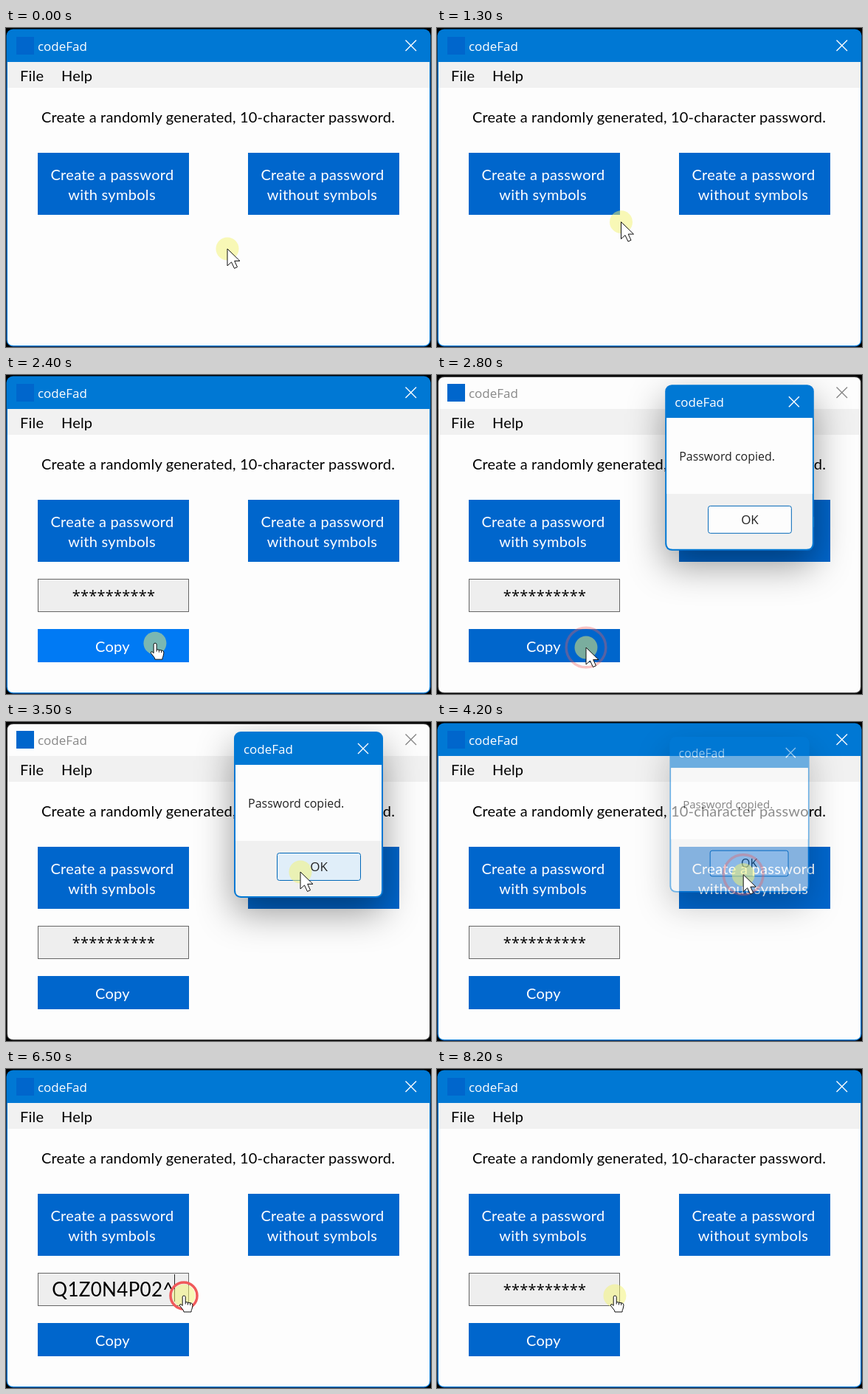
Write an HTML page that moves like this. It is 576 px wide and 432 px high and loops after 8300 ms.

```html
<!DOCTYPE html>
<html lang="en">
<head>
<meta charset="utf-8">
<title>Password generator</title>
<style>
html, body { margin: 0; width: 576px; height: 432px; overflow: hidden; background: #000; }
svg { display: block; }
text { font: 20px Lato, sans-serif; letter-spacing: .2px; }
.mid { text-anchor: middle; }
.sys { font: 17px "Open Sans", sans-serif; letter-spacing: 0; }
.msg { font-size: 16px; }
.btn rect { fill: #0066cc; }
.btn.hover rect { fill: #007af4; }
.btn text { fill: #fff; text-anchor: middle; letter-spacing: .3px; }
.x { stroke-width: 1.4; fill: none; }
#mask { font: 20px "Open Sans", sans-serif; }
#plain { font-size: 26px; letter-spacing: .3px; }
#dialog { transform-origin: 410px 125px; filter: drop-shadow(0 20px 25px rgba(0,0,0,.4)); }
</style>
</head>
<body>
<svg width="576" height="432" viewBox="0 0 576 432">
  <rect id="frame" x=".5" y="1.500" width="575" height="430" rx="9"/>
  <path id="bar" d="M2 46V11q0-8 8-8H566q8 0 8 8V46z"/>
  <path d="M2 46H574V422q0 8-8 8H10q-8 0-8-8z" fill="#fdfdfd"/>
  <rect x="2" y="46" width="572" height="35" fill="#f1f1f1"/>
  <rect x="14" y="12" width="24" height="24" fill="#0066cc"/>
  <text id="title" class="sys" x="43" y="31">codeFad</text>
  <path id="close" class="x" d="M541.500 16.500l14.500 14.500m0-14.500l-14.500 14.500"/>
  <text x="19" y="72">File</text>
  <text x="75" y="72">Help</text>
  <text class="mid" x="287.500" y="128">Create a randomly generated, 10-character password.</text>

  <g class="btn" id="with">
    <rect x="43" y="169" width="205" height="84"/>
    <text x="144" y="206">Create a password</text>
    <text x="143.500" y="233">with symbols</text>
  </g>
  <g class="btn">
    <rect x="328" y="169" width="205" height="84"/>
    <text x="429" y="206">Create a password</text>
    <text x="428.500" y="233">without symbols</text>
  </g>
  <g id="result">
    <rect x="43.500" y="276.500" width="204" height="44" fill="#eee" stroke="#666"/>
    <text id="mask" class="mid" x="146" y="306">**********</text>
    <g id="shown">
      <text id="plain" class="mid" x="145" y="308">Q1Z0N4P02^</text>
      <path d="M228.500 278V315" stroke="#222"/>
    </g>
    <g class="btn" id="copy">
      <rect x="43" y="344" width="205" height="45"/>
      <text x="144.500" y="375">Copy</text>
    </g>
  </g>

  <g id="dialog">
    <rect x="309" y="13" width="202" height="225" rx="9" fill="#0078d4"/>
    <path d="M311 58H509V228q0 8-8 8H319q-8 0-8-8z" fill="#f0f0f0"/>
    <rect x="311" y="58" width="198" height="103" fill="#fdfdfd"/>
    <text class="sys" x="322" y="43" fill="#fff">codeFad</text>
    <path class="x" d="M477 29l14 14m0-14l-14 14" stroke="#fff"/>
    <text class="sys msg" x="328" y="116" fill="#222">Password copied.</text>
    <rect id="ok" x="367.500" y="177.500" width="113" height="37" rx="3" stroke="#0067b8"/>
    <text class="sys mid" x="424" y="202" fill="#222">OK</text>
  </g>

  <g id="pointer">
    <circle r="15.500" fill="#f3f370" fill-opacity=".5"/>
    <circle id="ring" fill="none" stroke="#f05a5a" stroke-width="3.500"/>
    <g fill="#fff" stroke="#111" stroke-linejoin="round">
      <path id="arrow" d="M0 0V23L5.500 18L9.500 26.500L13.500 24.700L9.700 16.500H17z"/>
      <path id="hand" d="M-1.800 1.800Q-1.800 0 .2 0T2.200 1.800V8.500L10 10Q12 10.500 12 13L11 18Q10 19 10 22H0Q0 20-2 18L-5.500 13.500Q-6 11.500-4 11.500L-1.800 13.500zM2.200 8.500v3M5.500 9.500v3M8.700 10v3"/>
    </g>
  </g>
</svg>
<script>
const LOOP = 8300;
const $ = id => document.getElementById(id);
const show = (id, on) => $(id).style.display = on ? '' : 'none';
const clamp = v => Math.min(1, Math.max(0, v));
const ease = v => v * v * (3 - 2 * v);
const inside = ([x, y], l, t, r, b) => x >= l && x < r && y >= t && y < b;

// Pointer stops: time, x, y
const path = [
  [0, 300, 299], [1150, 300, 299], [1450, 200, 227], [2050, 200, 227],
  [2450, 202, 369], [2950, 202, 369], [3500, 399, 203], [3700, 418, 205],
  [4150, 418, 205], [4800, 257, 302], [5500, 241, 307], [LOOP, 241, 307]
];
const clicks = [1450, 2500, 3900, 5800, 6500, 7100, 7800];
const created = 1550, opened = 2600, closed = 4100;

function pointerAt(t) {
  const i = path.findIndex(p => p[0] > t);
  const [a, b] = [path[i - 1], path[i]];
  const k = ease((t - a[0]) / (b[0] - a[0]));
  return [a[1] + (b[1] - a[1]) * k, a[2] + (b[2] - a[2]) * k];
}

function draw(t) {
  const pos = pointerAt(t);
  const modal = t >= opened && t < closed;
  const ready = t >= created;

  $('frame').setAttribute('fill', modal ? '#333' : '#0078d4');
  $('bar').setAttribute('fill', modal ? '#fdfdfd' : '#0078d4');
  $('title').setAttribute('fill', modal ? '#888' : '#fff');
  $('close').setAttribute('stroke', modal ? '#888' : '#fff');

  const overWith = !modal && inside(pos, 43, 169, 248, 253);
  const overCopy = !modal && ready && inside(pos, 43, 344, 248, 389);
  const overField = !modal && ready && inside(pos, 43, 276, 248, 321);
  $('with').classList.toggle('hover', overWith);
  $('copy').classList.toggle('hover', overCopy);

  // Each click on the field toggles the mask on release
  const toggles = clicks.filter(c => c > 5000 && t >= c + 100).length;
  show('result', ready);
  show('mask', toggles % 2 === 0);
  show('shown', toggles % 2 === 1);

  const grow = ease(clamp((t - opened) / 220)) * (1 - clamp((t - closed) / 160));
  show('dialog', t >= opened && grow > 0);
  $('dialog').style.opacity = clamp(grow * 1.5);
  $('dialog').style.transform = `scale(${.9 + .1 * grow})`;
  const overOk = modal && inside(pos, 367, 177, 481, 215);
  $('ok').setAttribute('fill', !overOk ? '#fdfdfd' : t >= 3900 ? '#cce4f7' : '#e0eef9');

  const age = t - clicks.filter(c => c <= t).pop();
  const k = clamp((age - 100) / 250);
  show('ring', age < 350);
  $('ring').setAttribute('r', 18 + 11 * k);
  $('ring').setAttribute('opacity', 1 - .8 * k);

  const hand = overWith || overCopy || overField;
  show('hand', hand);
  show('arrow', !hand);
  $('pointer').setAttribute('transform', `translate(${pos})`);
}

function tick() {
  draw(performance.now() % LOOP);
  requestAnimationFrame(tick);
}
tick();
</script>
</body>
</html>
```
